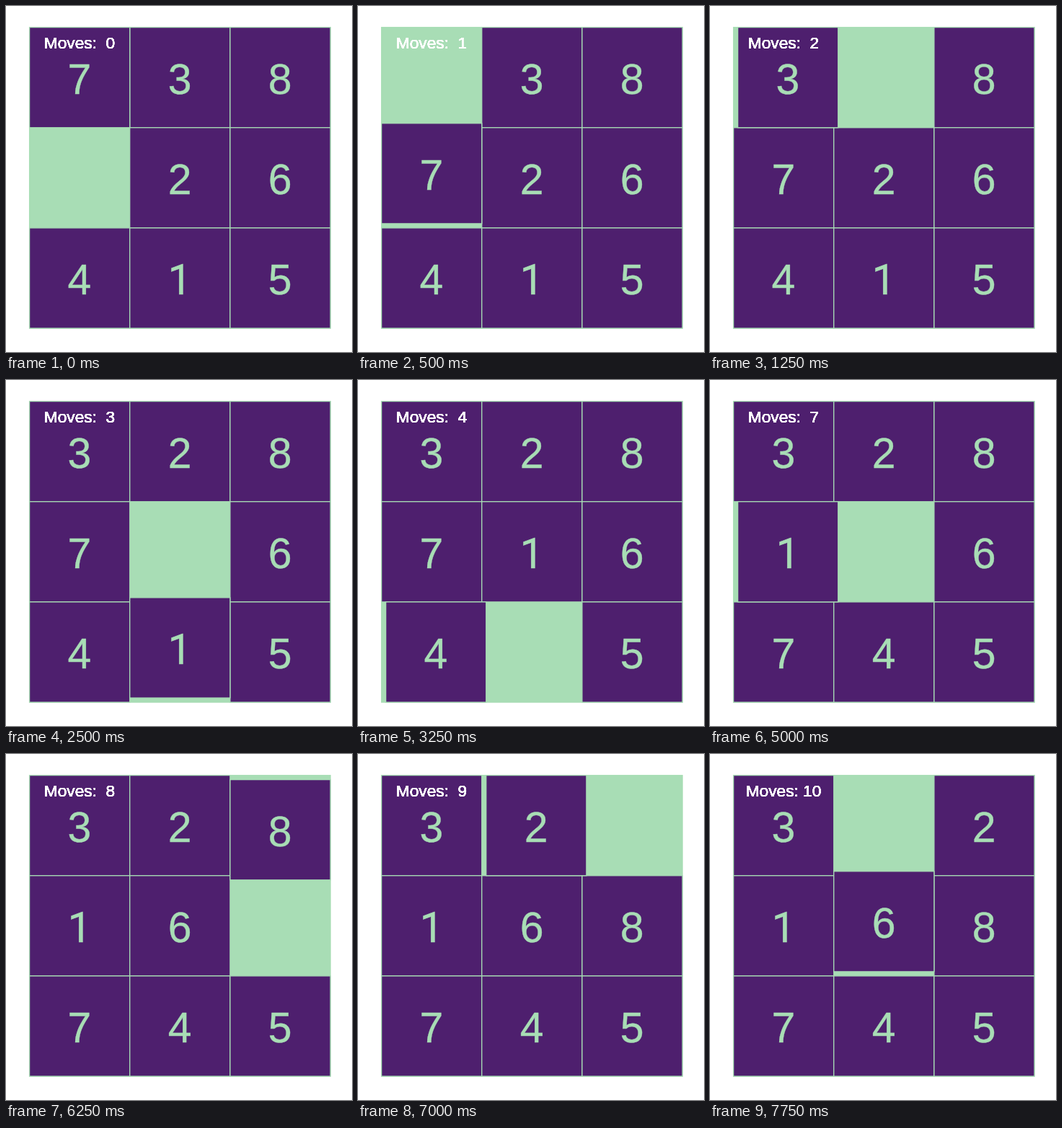
These frames come from a looping animation (480x480 px, 8 s). An HTML page with a canvas:

```html
<!DOCTYPE html>
<html lang="en">
<head>
<meta charset="utf-8">
<title>Sliding puzzle</title>
<style>
  html, body { margin: 0; width: 100%; height: 100%; overflow: hidden; background: #fff; }
  canvas { display: block; width: 480px; height: 480px; }
</style>
</head>
<body>
<canvas id="stage" width="480" height="480"></canvas>
<script>
const ctx = document.getElementById('stage').getContext('2d');

const LOOP = 8000, STEP = 250, STEPS_PER_MOVE = 3;
const LEFT = 32.6, TOP = 29.6, CELL = 139.15;
const PURPLE = '#4e1f6e', GREEN = '#a8ddb5';
const SANS = '"Liberation Sans", Arial, sans-serif';
const FOOTLESS = 'Roboto, sans-serif'; // its 1 has no base bar

const START = [7, 3, 8, 0, 2, 6, 4, 1, 5];
const MOVES = [7, 3, 2, 1, 4, 7, 1, 6, 8, 2, 6];
const EASED = [0, 6 / CELL, 1 - 6 / CELL];

function slide(board, tile) {
  return board.map(n => n === 0 ? tile : n === tile ? 0 : n);
}

function cellOrigin(index) {
  return [LEFT + index % 3 * CELL, TOP + Math.floor(index / 3) * CELL];
}

function drawSquare(x, y, size, fill) {
  ctx.fillStyle = fill;
  ctx.strokeStyle = GREEN;
  ctx.lineWidth = 1.3;
  ctx.fillRect(x, y, size, size);
  ctx.strokeRect(x, y, size, size);
}

function drawTile(n, x, y) {
  drawSquare(x, y, CELL, PURPLE);
  ctx.fillStyle = GREEN;
  ctx.font = `59px ${n === 1 ? FOOTLESS : SANS}`;
  ctx.lineWidth = 0.4;
  ctx.fillText(n, x + CELL / 2 - 0.2, y + 92);
  ctx.strokeText(n, x + CELL / 2 - 0.2, y + 92);
}

function drawCounter(count) {
  ctx.fillStyle = '#fff';
  ctx.font = `22.7px ${SANS}`;
  const label = `Moves: ${String(count).padStart(2)}`;
  // Overdrawing once per cell thickens the antialiased edges.
  for (const _ of START) ctx.fillText(label, 102, 59.2);
}

function draw(time) {
  const step = Math.floor(time % LOOP / STEP);
  const done = Math.floor(step / STEPS_PER_MOVE);
  const progress = EASED[step % STEPS_PER_MOVE];
  const board = MOVES.slice(0, done).reduce(slide, START);
  const moving = MOVES[done];
  const [x, y] = cellOrigin(board.indexOf(moving));
  const [gapX, gapY] = cellOrigin(board.indexOf(0));

  ctx.fillStyle = '#fff';
  ctx.fillRect(0, 0, 480, 480);
  ctx.textAlign = 'center';
  drawSquare(LEFT, TOP, 3 * CELL, GREEN);
  board.forEach((n, i) => {
    if (n && n !== moving) drawTile(n, ...cellOrigin(i));
  });
  drawTile(moving, x + (gapX - x) * progress, y + (gapY - y) * progress);
  drawCounter(done + Math.round(progress));
}

const began = performance.now();
function tick() {
  draw(performance.now() - began);
  requestAnimationFrame(tick);
}
tick();
</script>
</body>
</html>
```
